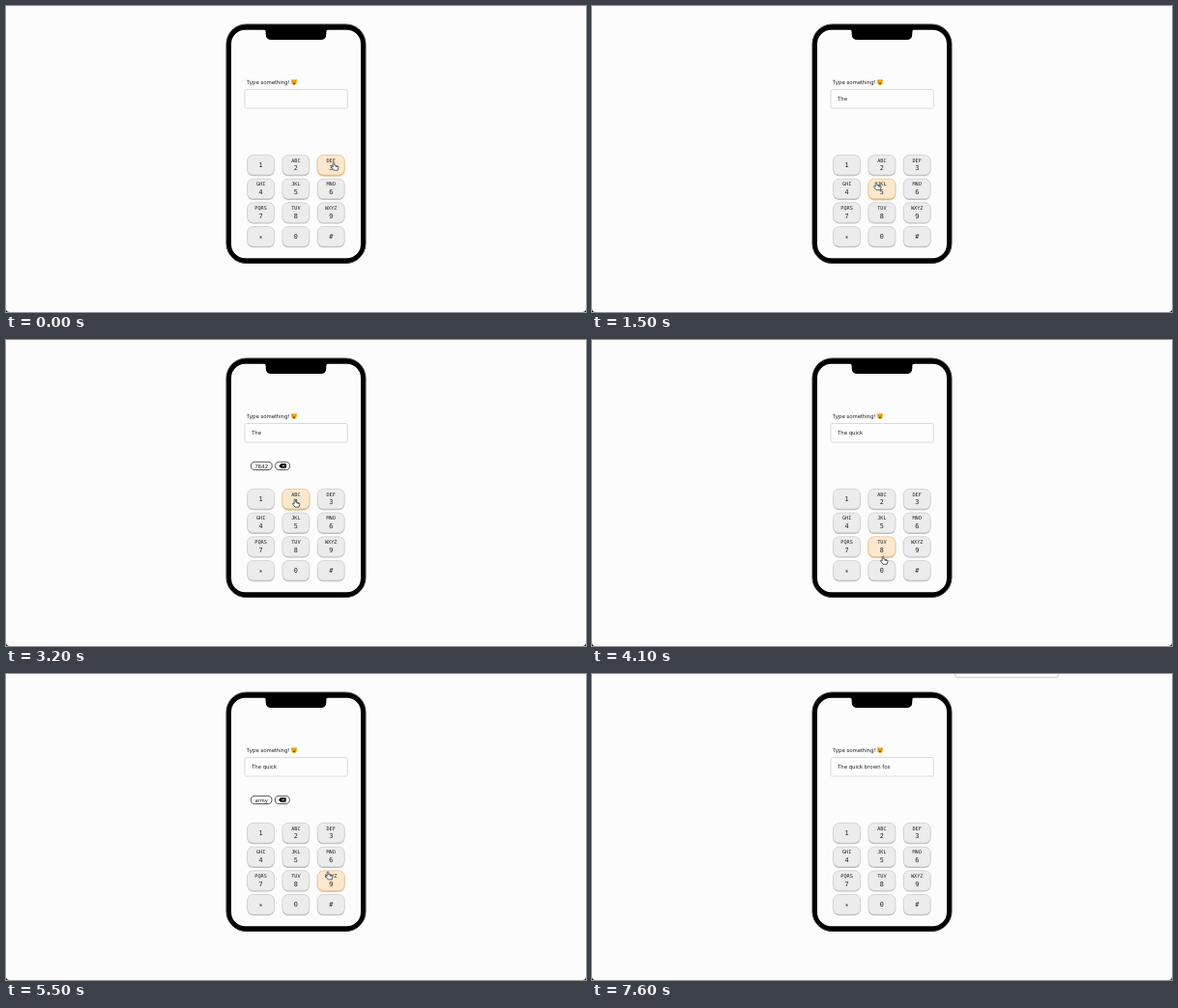
Recreate the animation shown at these times as an HTML page. Size 600 by 317 pixels, loop 7.7 s.

```html
<!DOCTYPE html>
<html lang="en">
<head>
<meta charset="utf-8">
<title>Keypad typing</title>
<style>
  html, body { margin: 0; width: 100%; height: 100%; overflow: hidden; background: #fcfcfc; }
  svg { display: block; width: 600px; height: 317px; }
  text { font: 5.7px Inter, "Open Sans", sans-serif; fill: #222; text-rendering: geometricPrecision; }
  .key rect { fill: #ececec; stroke: #cdcdcd; stroke-width: .8; }
  .key .edge { fill: #bdbdbd; stroke: none; }
  .key.hover rect { fill: #fce8cf; stroke: #e6c594; }
  .key.hover .edge { fill: #d9b27a; }
  .key text { font: 6.8px "DejaVu Sans Mono", monospace; text-anchor: middle; }
  .key .letters { font-size: 5.2px; }
  .chip rect { fill: #fdfdfd; stroke: #2b2b2b; stroke-width: .8; }
</style>
</head>
<body>
<svg id="stage" viewBox="0 0 600 317">
  <rect x="228" y="19" width="144" height="247.5" rx="20.5" stroke="#34373a"/>
  <rect x="233" y="24.7" width="134" height="236.6" rx="14.5" fill="#fcfcfc"/>
  <path d="M266.500 24H333.500Q331.300 24.700 331.300 27V29Q331.300 35 325.300 35H274.700Q268.700 35 268.700 29V27Q268.700 24.700 266.500 24Z"/>

  <text x="248.400" y="80.800">Type something!</text>
  <g id="face">
    <circle cx="298" cy="79" r="3" fill="#f9c136"/>
    <path d="M295.100 78.500V75.800L297 76.800H299L300.900 75.800V78.500Z" fill="#f3b02c"/>
    <path d="M296.400 79.500H299.600Q299.300 81.300 298 81.300T296.400 79.500Z" fill="#6b3a1c"/>
    <circle cx="296.800" cy="78" r=".5" fill="#7a4a12"/>
    <circle cx="299.200" cy="78" r=".5" fill="#7a4a12"/>
  </g>
  <rect x="247" y="86.500" width="106.300" height="19.500" rx="1.600" fill="#fdfdfd" stroke="#d6d6d6" stroke-width=".9"/>
  <text id="field" x="253.700" y="98.400"></text>

  <g id="keys"></g>

  <g id="chips" class="chip">
    <rect id="pill" x="253.400" y="126.300" height="8.200" rx="4.100"/>
    <text id="word" x="257.400" y="132.500"></text>
    <g id="erase">
      <rect y="126.300" width="15" height="8.200" rx="4.100"/>
      <path d="M3.700 130.400L6 128H10.600Q11.300 128 11.300 128.700V132.100Q11.300 132.800 10.600 132.800H6Z"/>
      <path d="M7.200 129.200L9.600 131.600M9.600 129.200L7.200 131.600" stroke="#fff" stroke-width=".7"/>
    </g>
  </g>

  <g id="cursor" stroke-linejoin="round">
    <path id="hand" d="M-.8 .6Q0 -.7 .8 .6V3L3.800 3.700Q5.200 4 5 5.300L4.200 8.200H.1L-2.200 5.200Q-2.700 4 -1.600 4.100L-.8 4.800ZM2.300 3.600V5M3.700 3.900V5.200" fill="#fff" stroke="#222" stroke-width=".7"/>
    <path id="arrow" d="M0 0V5.600L1.300 4.400L2.200 6.600L3.100 6.200L2.200 4.100H4Z" stroke="#fff" stroke-width=".5"/>
    <path id="beam" d="M-1 -3.500H1M0 -3.500V3.500M-1 3.500H1" stroke="#222" stroke-width=".7"/>
  </g>

  <g id="panel">
    <rect x="375.500" y="-8" width="107.200" height="12.300" rx="2.500" fill="#dedede"/>
    <rect x="376" y="-8" width="106.200" height="11.300" rx="2" fill="#fff" stroke="#c9c9c9" stroke-width=".7"/>
  </g>
  <path d="M0 313.500Q0 317 3.500 317H0ZM600 313.500Q600 317 596.500 317H600Z"/>
</svg>
<script>
const LOOP = 7700, TICK = 100;
const KEY_W = 28, KEY_H = 21;
const $ = id => document.getElementById(id);

function add(parent, tag, attrs, label = '') {
  const node = document.createElementNS('http://www.w3.org/2000/svg', tag);
  for (const name in attrs) node.setAttribute(name, attrs[name]);
  node.textContent = label;
  return parent.appendChild(node);
}

const letters = ['', 'ABC', 'DEF', 'GHI', 'JKL', 'MNO', 'PQRS', 'TUV', 'WXYZ', '', '', ''];
const keys = [...'123456789*0#'].map((name, i) => {
  const x = 249.6 + i % 3 * 36.3, y = 154.4 + Math.floor(i / 3) * 24.7;
  const cx = x + KEY_W / 2;
  const node = add($('keys'), 'g', { class: 'key' });
  add(node, 'rect', { class: 'edge', x, y: y + .8, width: KEY_W, height: KEY_H, rx: 6 });
  add(node, 'rect', { x, y, width: KEY_W, height: KEY_H - .4, rx: 6 });
  if (letters[i]) add(node, 'text', { class: 'letters', x: cx, y: y + 7.1 }, letters[i]);
  const drop = letters[i] ? 16 : name === '*' ? 14.2 : 12.9;
  add(node, 'text', { x: cx, y: y + drop }, name);
  return { name, x, y, node };
});

// Pointer stops: time, then a key name, 'chip' or a point.
const stops = [
  [0, [339, 162]], [200, '8'], [400, '8'], [600, '4'], [700, '4'],
  [800, [331, 163]], [900, [331, 163]], [1000, [300, 147]], [1100, 'chip'], [1300, 'chip'],
  [1400, [282, 150]], [1600, [306, 215]], [1800, [309, 219]], [2000, '4'],
  [2200, [266, 216]], [2400, [266, 216]], [2600, '8'], [2700, '8'], [2900, '4'], [3000, '4'],
  [3100, '2'], [3200, '2'], [3300, '5'], [3400, '5'], [3500, [281, 150]], [3600, 'chip'], [3700, 'chip'],
  [3800, [284, 150]], [3900, '5'], [4100, [301, 224]], [4300, '9'], [4500, '3'],
  [4700, '2'], [4800, '2'], [5000, '7'], [5100, '7'], [5300, '6'], [5400, '9'],
  [5500, [333, 204.7]], [5600, '6'], [5700, '6'], [5800, [300, 150]], [5900, 'chip'], [6000, 'chip'],
  [6100, [284, 148]], [6200, '3'], [6400, '3'], [6500, [333, 186]], [6600, '6'], [6700, '9'], [6800, '9'],
  [6900, [300, 150]], [7000, 'chip'], [7100, [276.5, 61.5]]
].map(([at, place]) => ({ at, point: locate(place) }));

// Each press: time, suggestion shown, text typed so far.
const presses = [
  [0, '', ''], [300, '8', ''], [700, '84', ''], [900, 'the', ''], [1300, '', 'The'],
  [2400, '7', 'The'], [2700, '78', 'The'], [3000, 'rug', 'The'], [3200, '7842', 'The'],
  [3400, 'quick', 'The'], [3700, '', 'The quick'],
  [4800, 'a', 'The quick'], [5100, 'as', 'The quick'], [5300, 'arm', 'The quick'],
  [5500, 'army', 'The quick'], [5700, 'brown', 'The quick'], [6000, '', 'The quick brown'],
  [6400, '3', 'The quick brown'], [6600, 'do', 'The quick brown'],
  [6800, 'fox', 'The quick brown'], [7000, '', 'The quick brown fox']
];

function locate(place) {
  if (Array.isArray(place)) return place;
  if (place === 'chip') return [262, 130];
  const key = keys.find(k => k.name === place);
  return [key.x + 13, key.y + 10.5];
}

function pointerAt(t) {
  const next = stops.findIndex(s => s.at > t);
  if (next < 0) return stops[stops.length - 1].point;
  const a = stops[next - 1], b = stops[next];
  const p = (t - a.at) / (b.at - a.at);
  return a.point.map((v, i) => v + (b.point[i] - v) * p);
}

const show = (id, on) => $(id).setAttribute('display', on ? 'inline' : 'none');
const inside = (x, y, left, top, w, h) => x >= left && x <= left + w && y >= top && y <= top + h;

function draw(t) {
  const [, word, typed] = presses.filter(p => p[0] <= t).pop();
  $('field').textContent = typed;
  show('chips', word);
  $('word').textContent = word;
  const width = word ? $('word').getComputedTextLength() + 8 : 0;
  $('pill').setAttribute('width', width);
  $('erase').setAttribute('transform', `translate(${256.8 + width})`);

  const visible = t < 7200;
  const [x, y] = pointerAt(t);
  let onKey = false;
  for (const key of keys) {
    const hover = visible && inside(x, y, key.x, key.y, KEY_W, KEY_H);
    key.node.classList.toggle('hover', hover);
    onKey = onKey || hover;
  }
  const onChip = inside(x, y, 253, 126, 30, 9);
  const onField = inside(x, y, 247, 86, 106, 20);
  show('cursor', visible);
  $('cursor').setAttribute('transform', `translate(${x} ${y})`);
  show('hand', onKey || onChip);
  show('beam', onField);
  show('arrow', !onKey && !onChip && !onField);
  show('panel', t >= 7600);
}

function frame() {
  draw(Math.floor(performance.now() % LOOP / TICK) * TICK);
  requestAnimationFrame(frame);
}
frame();
</script>
</body>
</html>
```
